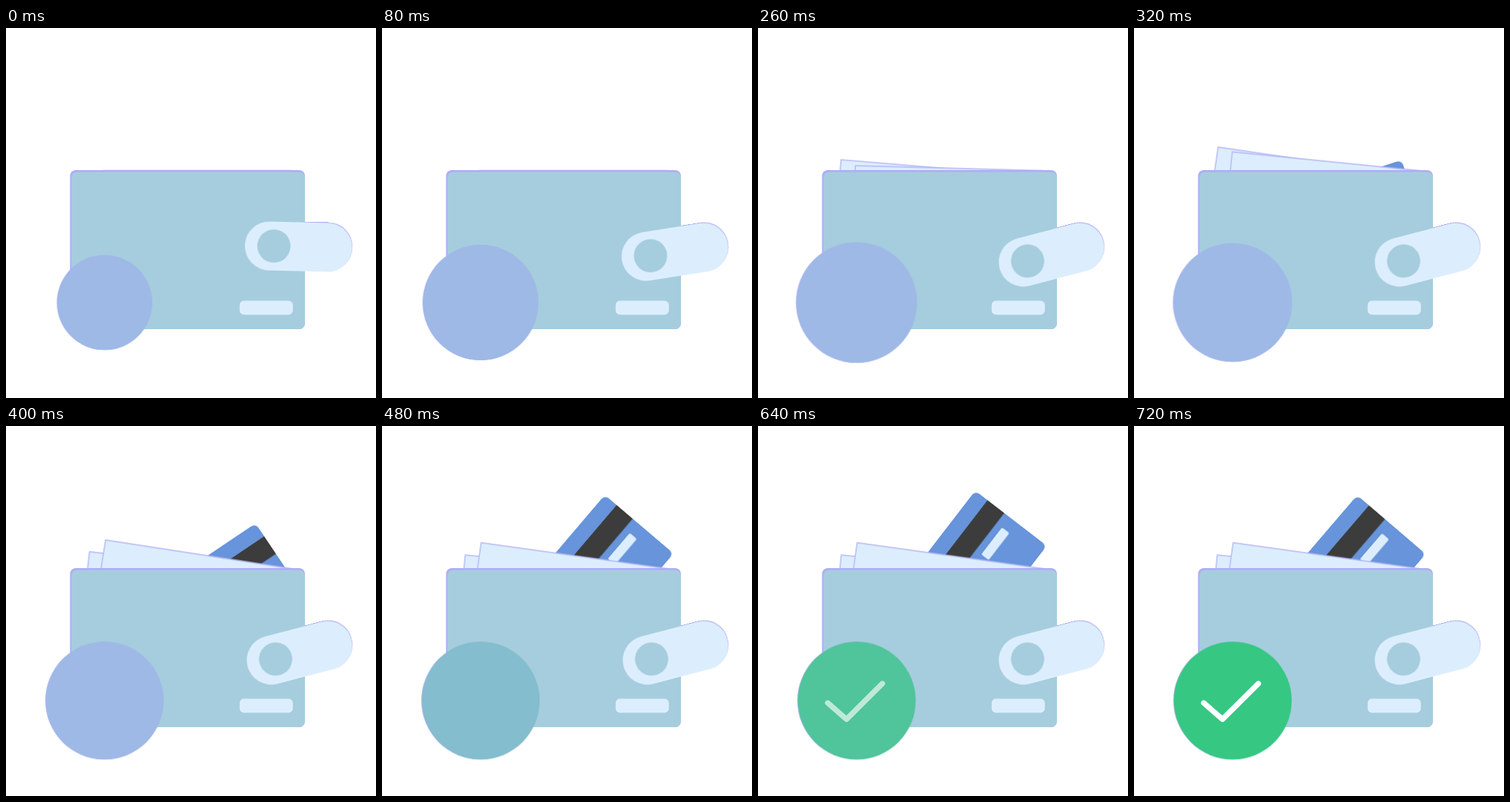
These frames come from a looping animation (500 px wide and 500 px high, 1340 ms). An HTML page:

```html
<!DOCTYPE html>
<html lang="en">
<head>
<meta charset="utf-8">
<title>Wallet</title>
<style>
  html, body { margin: 0; width: 100%; height: 100%; overflow: hidden; background: #fff; }
  svg { display: block; width: 100vw; height: 100vh; }

  .blue { fill: #a6cdde; }
  .pale { fill: #dceefd; }
  .edge { fill: #aeaef6; }
  .sheet { fill: #dceefd; stroke: #b3b3f6; stroke-width: 1.4; }

  .card, .back, .front, .flap, .badge, .disc, .check {
    animation: 1340ms linear infinite;
  }
  .card { animation-name: card; }
  .back { animation-name: back; }
  .front { animation-name: front; }
  .flap { animation-name: flap; }
  .badge { animation-name: badge; }
  .disc { animation-name: tint; }
  .check { animation-name: check; }

  /* swings out, overshoots, settles */
  @keyframes card {
    0%, 14.925% { transform: rotate(95.5deg); }
    23.881% { transform: rotate(72deg); }
    35.821% { transform: rotate(40.6deg); }
    38.806% { transform: rotate(33deg); }
    53.731%, 100% { transform: rotate(40.6deg); }
  }
  @keyframes back {
    0%, 14.925% { transform: rotate(0deg); }
    23.134% { transform: rotate(8.6deg); }
    32.836%, 100% { transform: rotate(5.55deg); }
  }
  @keyframes front {
    0%, 17.91% { transform: rotate(0deg); }
    23.881% { transform: rotate(5.64deg); }
    27.612% { transform: rotate(9.1deg); }
    35.821%, 100% { transform: rotate(7.94deg); }
  }
  @keyframes flap {
    0% { transform: rotate(1.6deg); animation-timing-function: cubic-bezier(.333, .667, .667, 1); }
    14.925%, 100% { transform: rotate(-14.6deg); }
  }
  @keyframes badge {
    0% { transform: scale(.64); }
    5.97% { transform: scale(.778); animation-timing-function: ease-out; }
    10.448% { transform: scale(.838); animation-timing-function: ease-in; }
    14.925% { transform: scale(.828); }
    23.881% { transform: scale(.802); animation-timing-function: ease-out; }
    29.851%, 100% { transform: scale(.796); }
  }
  @keyframes tint {
    0%, 29.851% { fill: #9eb9e6; }
    53.731%, 100% { fill: #36c783; }
  }
  @keyframes check {
    0%, 37.687% { opacity: 0; }
    53.731%, 100% { opacity: 1; }
  }
</style>
</head>
<body>
<svg viewBox="0 0 500 500">
  <defs>
    <clipPath id="above"><rect width="500" height="200"/></clipPath>
    <clipPath id="outside"><rect x="404" y="240" width="90" height="110"/></clipPath>
    <clipPath id="cardShape"><rect x="-5" y="-193" width="122" height="190" rx="7"/></clipPath>
  </defs>

  <g clip-path="url(#above)">
    <g transform="translate(179.8 243.4)">
      <g class="card">
        <g clip-path="url(#cardShape)">
          <rect x="-5" y="-193" width="122" height="190" fill="#6794da"/>
          <rect x="16" y="-193" width="28.5" height="190" fill="#3c3c3c"/>
          <rect class="pale" x="54" y="-175.8" width="12.5" height="46" rx="2"/>
          <rect class="pale" x="54" y="-121.5" width="12.5" height="46" rx="2"/>
        </g>
      </g>
    </g>
  </g>

  <g transform="translate(385 192.7)">
    <g class="back"><rect class="sheet" x="-273" y="8" width="273" height="120"/></g>
    <g class="front"><rect class="sheet" x="-253.5" y="0" width="253.5" height="120"/></g>
  </g>

  <rect class="edge" x="86.5" y="192" width="317.5" height="215" rx="8"/>
  <rect class="blue" x="88.5" y="194.7" width="315.5" height="212.3" rx="8"/>
  <rect class="pale" x="315.7" y="368.5" width="72" height="19" rx="6"/>

  <g clip-path="url(#outside)">
    <g transform="translate(435 295.5)">
      <g class="flap"><rect class="edge" x="-112.2" y="-33" width="145.4" height="66" rx="33"/></g>
    </g>
  </g>
  <g transform="translate(435 296.5)">
    <g class="flap">
      <rect class="pale" x="-112.2" y="-33" width="145" height="66" rx="33"/>
      <circle class="blue" cx="-73" cy="0" r="22.5"/>
    </g>
  </g>

  <g transform="translate(133.5 371)">
    <g class="badge">
      <circle class="edge" cx="-1" r="100"/>
      <circle class="disc" r="100"/>
    </g>
  </g>
  <path class="check" d="M94.3 374.3 119.5 396.3 168 348.2" fill="none" stroke="#fff" stroke-width="7.4" stroke-linecap="round" stroke-linejoin="round"/>
</svg>
</body>
</html>
```
